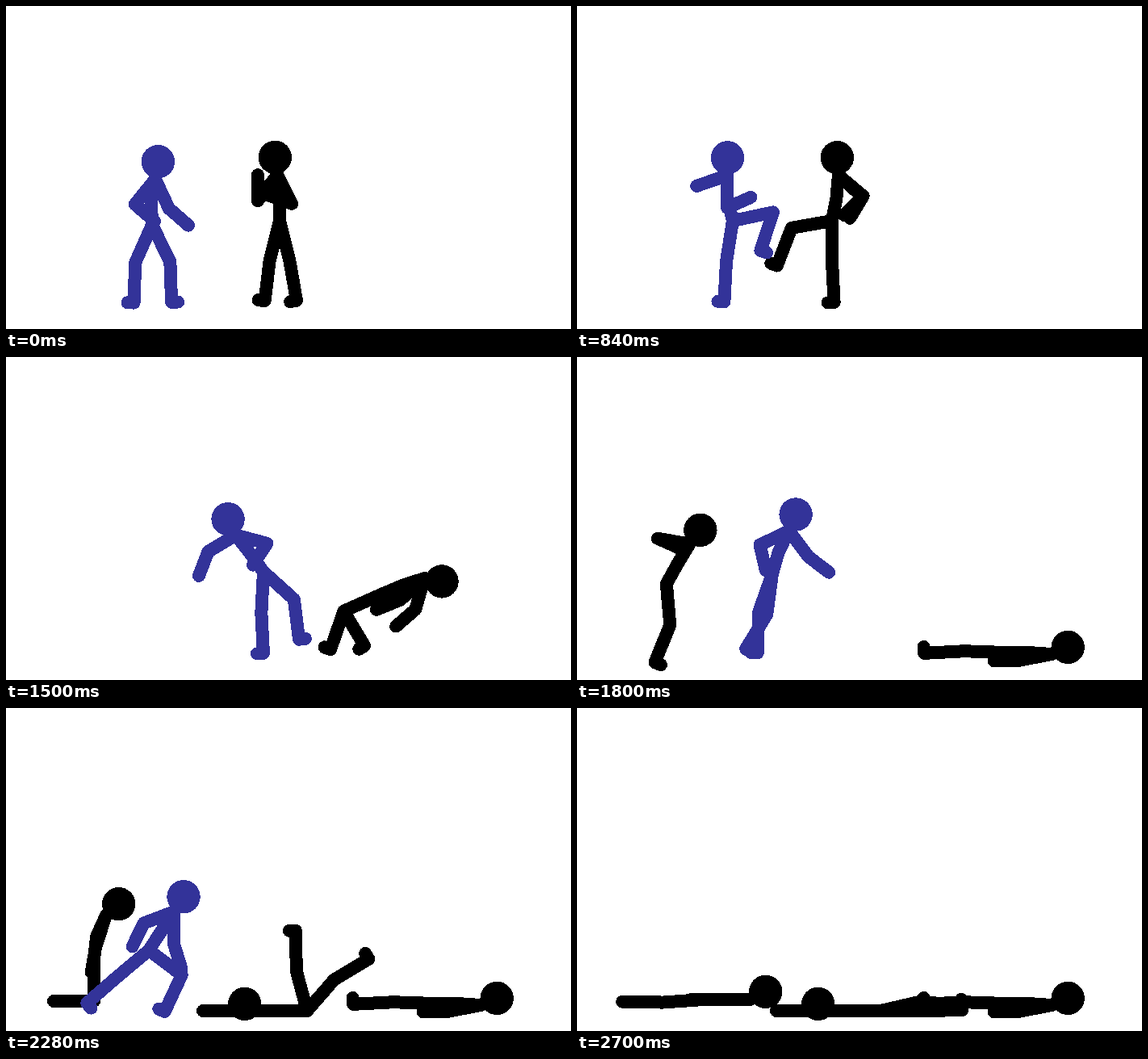
Animation of 700 by 400 pixels, one loop 3.12 s. Source, as an HTML page:

```html
<!DOCTYPE html>
<html lang="en">
<head>
<meta charset="utf-8">
<title>Stick fight</title>
<style>
html, body { margin: 0; width: 100%; height: 100%; overflow: hidden; background: #fff; }
svg { display: block; width: 100%; height: 100%; }
path { fill: none; stroke-width: 16; stroke-linecap: round; stroke-linejoin: round; }
</style>
</head>
<body>
<svg id="stage" viewBox="0 0 700 400" shape-rendering="crispEdges"></svg>
<script>
const LOOP = 3120, STEP = 60, START = 360, END = 2700, STRIDE = 120;
const SPINE = [28.5, 28.5, 22], ARM = [40, 32], LEG = [51, 50, 8];
const stage = document.getElementById('stage');

function add(tag, attrs) {
  const el = document.createElementNS('http://www.w3.org/2000/svg', tag);
  for (const k in attrs) el.setAttribute(k, attrs[k]);
  return stage.appendChild(el);
}

// Follows bones of fixed length from a joint; angles in degrees, clockwise from right
function chain(from, bones, angles) {
  const pts = [from];
  bones.forEach((len, i) => {
    const [x, y] = pts[i], a = angles[i] * Math.PI / 180;
    pts.push([x + len * Math.cos(a), y + len * Math.sin(a)]);
  });
  return pts;
}

const line = pts => 'M' + pts.map(p => p.map(v => v.toFixed(2)).join(' ')).join('L');

class Figure {
  // feet: how far each foot turns from its shin
  constructor(color, feet) {
    this.keys = [];
    this.feet = feet;
    this.until = Infinity;
    this.body = add('path', { stroke: color });
    this.head = add('circle', { r: 20.7, fill: color });
  }

  // A limb left out moves like its twin
  at(time, x, y, { spine, arms, legs }) {
    const arm = i => arms[i] || arms[0];
    const leg = i => {
      const [thigh, shin, foot = this.feet[i]] = legs[i] || legs[0];
      return [thigh, shin, shin + foot];
    };
    this.keys.push({ time, v: [x, y, ...spine, ...arm(0), ...arm(1), ...leg(0), ...leg(1)] });
    return this;
  }

  hold(time) {
    this.keys.push({ time, v: this.keys[this.keys.length - 1].v });
    return this;
  }

  run(t0, x0, t1, x1, y) {
    for (let t = t0; t <= t1; t += STRIDE) {
      const s = Math.cos(Math.PI * t / STRIDE);
      const x = x0 + (x1 - x0) * (t - t0) / (t1 - t0);
      const arm = k => [190 + 20 * k, 24 - 24 * k];
      const leg = k => [85 - 43 * k, 112 - 45 * k];
      this.at(t, x, y, { spine: [-61, -59, -52], arms: [arm(s), arm(-s)], legs: [leg(s), leg(-s)] });
    }
    return this;
  }

  pose(time) {
    const k = this.keys;
    let i = 0;
    while (i < k.length - 2 && time >= k[i + 1].time) i++;
    const a = k[i], b = k[i + 1];
    const u = Math.max(0, Math.min(1, (time - a.time) / (b.time - a.time)));
    return a.v.map((n, j) => n + (b.v[j] - n) * u);
  }

  draw(time) {
    const show = time < this.until ? 'visible' : 'hidden';
    const v = this.pose(time), hip = v.slice(0, 2);
    const spine = chain(hip, SPINE, v.slice(2, 5));
    const [, , neck, head] = spine;
    const limbs = [
      spine,
      chain(neck, ARM, v.slice(5, 7)),
      chain(neck, ARM, v.slice(7, 9)),
      chain(hip, LEG, v.slice(9, 12)),
      chain(hip, LEG, v.slice(12, 15))
    ];
    this.body.setAttribute('d', limbs.map(line).join(''));
    this.body.setAttribute('visibility', show);
    this.head.setAttribute('visibility', show);
    this.head.setAttribute('cx', head[0]);
    this.head.setAttribute('cy', head[1]);
  }
}

const first = new Figure('#000', [90, 90]);
const third = new Figure('#000', [-90, -90]);
const blue = new Figure('#333399', [90, -90]);
const second = new Figure('#000', [-90, -90]);
blue.until = END;

const guard = { spine: [-92, -80, -81], arms: [[129, 41], [65, 41]], legs: [[114, 92], [64, 88]] };
const block = { spine: [-104, -90, -89], arms: [[161, -19], [90, -24]], legs: [[99, 93], [-12, 108]] };
const punch = { spine: [-88, -70, -83], arms: [[149, 24], [-10, -10]], legs: [[129, 98], [52, 86]] };
const sideKick = { spine: [-130, -125, -117], arms: [[140, 115], [20, 125]], legs: [[91, 86], [10, -10]] };
const recover = { spine: [-126, -128, -116], arms: [[149, 111], [15, 123]], legs: [[93, 87], [42, 83]] };
const backKick = { spine: [-1, 2, -13], arms: [[255, 221], [5, 23]], legs: [[91, 89], [232, 255]] };
const lunge = { spine: [-57, -57, -57], arms: [[159, 116], [90, 73]], legs: [[37, 115], [140, 139]] };

blue.at(START, 181, 271, guard)
  .at(840, 193, 266, block)
  .at(1140, 268, 284, punch)
  .at(1380, 316, 267, sideKick)
  .at(1500, 319, 266, recover)
  .at(1740, 250, 271, guard)
  .at(2040, 210, 257, backKick)
  .at(2280, 177, 300, lunge)
  .run(2400, 290, 2640, 602, 288);

first
  .at(START, 339, 266, { spine: [-89, -97, -97], arms: [[127, 270], [63, 200]], legs: [[104, 97], [76, 80]] })
  .at(840, 316, 266, { spine: [-79, -85, -94], arms: [[40, 121], [42, 135]], legs: [[170, 111], [90, 87]] })
  .at(1140, 354, 276, { spine: [-80, -95, -78], arms: [[138, 218], [90, 182]], legs: [[113, 80], [82, 96]] })
  .at(1500, 465, 294, { spine: [-23, -18, 10], arms: [[106, 139], [138, 158]], legs: [[156, 109], [156, 59]] })
  .at(1620, 531, 366, { spine: [0, 4, -23], arms: [[169, 179]], legs: [[182, 177]] });

second.run(1500, -110, 1860, 155, 281)
  .at(2040, 280, 297, { spine: [127, 178, 160], arms: [[264, 215], [86, 188]], legs: [[300, 399], [390, 502]] })
  .at(2280, 373, 375, { spine: [180, 180, 203], arms: [[180, 180]], legs: [[255, 269], [311, 329]] })
  .at(2520, 376, 375, { spine: [180, 180, 203], arms: [[180, 180]], legs: [[347, 366], [360, 359]] });

third.run(1920, -85, 2160, 77, 280)
  .at(2280, 109, 312, { spine: [-84, -66, -43], arms: [[108, 100]], legs: [[90, 180, 180]] })
  .hold(2460)
  .at(END, 157, 361, { spine: [0, 0, -26], arms: [[180, 180]], legs: [[176, 181, 180]] });

function render(ms) {
  const t = Math.floor((ms % LOOP) / STEP) * STEP;
  const shown = Math.max(START, Math.min(END, t));
  for (const f of [first, third, blue, second]) f.draw(shown);
}

const begin = performance.now();
function tick() {
  render(performance.now() - begin);
  requestAnimationFrame(tick);
}
tick();
</script>
</body>
</html>
```
